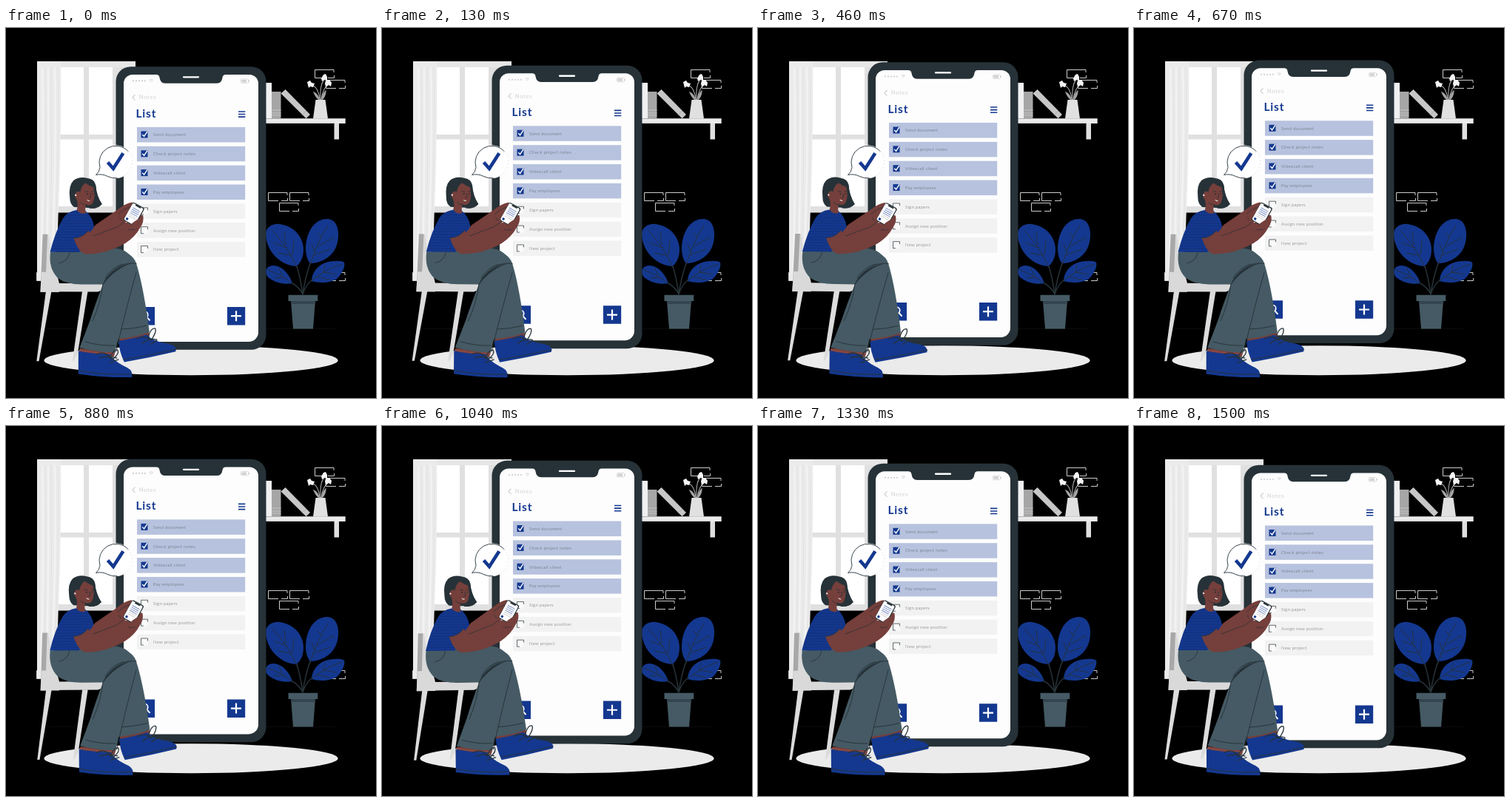
Animation of 500x500 px, one loop 1.54 s. Source, as an HTML page:

```html
<!DOCTYPE html>
<html lang="en">
<head>
<meta charset="utf-8">
<title>To-do list</title>
<style>
html, body { margin: 0; width: 100%; height: 100%; overflow: hidden; background: #000; }
svg { display: block; width: 100vw; height: 100vh; }
text { font-family: Lato, "Open Sans", sans-serif; }
.blue { fill: #14388f; }
.dark { fill: #263238; }
.slate { fill: #455a64; }
.skin { fill: #753f3b; }
.line { fill: none; stroke: #263238; stroke-width: .9; stroke-linecap: round; stroke-linejoin: round; }
.tick { fill: none; stroke: #fff; stroke-width: 1.4; }
.brick { fill: none; stroke: #e4e4e4; stroke-width: .9; }
.item { font-size: 6px; font-weight: 300; letter-spacing: .28px; fill: #50565c; }
</style>
</head>
<body>
<svg viewBox="0 0 500 500">
  <defs>
    <pattern id="stripes" width="8" height="3.8" patternUnits="userSpaceOnUse">
      <rect class="blue" width="8" height="3.8"/>
      <path d="M0 2H8" stroke="#10296a" stroke-width=".7"/>
    </pattern>
    <path id="brick" d="M26 4V.5H.5V11.500H14M18 11.500H26.500V8"/>
  </defs>

  <g id="room">
    <path d="M55 406.500H445" stroke="#101010" stroke-width=".8"/>
    <g id="bricks" class="brick"></g>

    <path fill="#e0e0e0" d="M42 45H175V249.500H60V45Z"/>
    <path fill="#e6e6e6" d="M72 45H175V53H72Z"/>
    <path fill="#fff" d="M70 53h35v91H70zM112 53h32v91h-32zM70 150.500h35V241H70zM112 150.500h32V241h-32z"/>
    <path fill="#ebebeb" d="M42 45H74Q75 150 71 240Q69 300 69 341H42Z"/>
    <path fill="none" stroke="#f5f5f5" stroke-width="1.600" d="M49 53Q52 180 47 338M57 53Q58 180 55 338M66 53Q68 170 63 300"/>
    <path fill="none" stroke="#e0e0e0" stroke-width=".8" d="M53 53Q55 180 51 338M61 53Q63 180 59 320M70 53Q72 150 67 280"/>

    <path fill="#f0f0f0" d="M351 74h8v48h-8z"/>
    <path fill="#a6a6a6" d="M359 86h12.500v36H359z"/>
    <path stroke="#c4c4c4" stroke-width="1" d="M359 111h12.500M359 115h12.500M359 118h12.500"/>
    <path fill="#c7c7c7" d="M371.500 88.500L377.500 83L411 117L405.500 122.300Z"/>
    <path stroke="#adadad" d="M400 117.500L406 112"/>
    <path fill="#e0e0e0" d="M443.500 128h6.500v22.500h-6.500zM418.500 97h13l3.500 25.500h-20z"/>
    <path fill="#ebebeb" d="M350 122.300H458.700V129H350z"/>
    <path fill="#d6d6d6" d="M350 127.500H444V129H350z"/>
    <g fill="none" stroke="#a6a6a6" stroke-width="1.100">
      <path d="M424 97Q423 82 414 77M425 97Q424 76 430 70M426 97Q428 82 435 77"/>
      <path fill="#a6a6a6" d="M423 97Q419 94 416 87Q422 90 423 97M427 97Q427 90 432 85Q432 92 427 97"/>
    </g>
    <path fill="#f4f4f4" d="M407 73L411 71L413 74L417 75L415 80L411 79L409 81ZM426 68L429 63L432 62L434 66L434 71L430 70L427 72ZM432 71L437 70L440 74L439 79L436 77L432 80L431 75Z"/>

    <ellipse cx="250" cy="449.200" rx="198.500" ry="20" fill="#ebebeb"/>

    <path class="blue" d="M392 322C372 321 352 303 351 279C351 269 360 264 370 265C391 268 402 284 402 300C402 311 397 319 392 322Z"/>
    <path class="blue" d="M411 318C403 309 403 288 411 273C418 260 432 255 441 260C451 266 451 286 445 298C438 312 423 318 411 318Z"/>
    <path class="blue" d="M387 345C374 348 357 342 352 334C349 327 353 321 362 321C374 322 383 333 387 345Z"/>
    <path class="blue" d="M413 342C413 332 420 321 432 317C442 314 455 314 457 317C459 321 454 333 447 339C438 345 423 345 413 342Z"/>
    <path class="line" d="M360 274Q383 298 393 324M363 291L380 297M369 304L386 308M376 276L378 293M389 288L387 306M435 267Q420 290 411 320M421 277L426 282M443 283L422 295M413 292L417 303M438 299L416 307M354 327Q373 334 388 346M363 338L375 337M369 325L373 334M454 319Q430 327 412 342M431 321L429 330M446 333L429 330M437 340L420 336"/>
    <path class="line" style="stroke-width:1.500" d="M401 360Q398 338 393 322M401 360Q404 338 411 318M401 360Q396 350 387 345M401 360Q405 347 413 341"/>
    <path class="slate" d="M385 368H418L415 406.500H388Z"/>
    <path fill="#344650" d="M385 368H418L417.500 373H385.500Z"/>
    <path class="slate" d="M381.500 360.800H421.300V369H381.500Z"/>
  </g>

  <g id="device">
    <rect class="dark" x="148.500" y="52.300" width="203" height="382.500" rx="20"/>
    <path fill="#fdfdfd" d="M171 63H203Q207 63 207.500 67Q208.500 74.700 215 74.700H285Q291.500 74.700 292.500 67Q293 63 297 63H329A12 12 0 0 1 341 75V411A13 13 0 0 1 328 424H172A13 13 0 0 1 159 411V75A12 12 0 0 1 171 63Z"/>
    <path stroke="#fff" stroke-width="2.300" stroke-linecap="round" d="M240 66.400H260"/>
    <path stroke="#cfcfcf" stroke-width="2.200" stroke-linecap="round" stroke-dasharray="0 4" d="M172 71.500H189"/>
    <path fill="none" stroke="#d2d2d2" d="M193.500 70.500Q196.200 68.200 199 70.500M194.800 72.300Q196.200 71 197.700 72.300"/>
    <path fill="#d2d2d2" d="M318.500 70h6.500v3.500h-6.500zM328 70.700h1v2h-1z"/>
    <rect x="317.500" y="69" width="10" height="5.400" rx="1" fill="none" stroke="#d2d2d2" stroke-width=".8"/>
    <path fill="none" stroke="#cfcfcf" stroke-width="1.200" d="M174.500 90L171 93.800L174.500 97.600"/>
    <text x="179.800" y="96.400" font-size="7.500" font-weight="700" letter-spacing=".7" fill="#dcdcdc">Notes</text>
    <text class="blue" x="175.500" y="120.700" font-size="15.500" font-weight="700" letter-spacing=".8">List</text>
    <path stroke="#14388f" stroke-width="1.600" d="M314 113h9.300M314 116.600h9.300M314 120.200h9.300"/>
    <g id="rows"></g>
    <path class="blue" d="M177 377h24v24.500h-24zM299 377h24.200v24.500H299z"/>
    <path stroke="#fff" stroke-width="2.200" d="M304 389.200h14M311 382.200v14"/>
    <path fill="none" stroke="#fff" stroke-width="2" d="M190.500 391L194.500 395.500"/>
    <circle cx="187.500" cy="387.500" r="4.200" fill="none" stroke="#fff" stroke-width="1.800"/>
  </g>

  <g id="bubble">
    <path fill="#fff" d="M121.500 198.500Q126 195 127 188.500A22.500 22.500 0 1 1 138 200.800Q130 196.500 121.500 198.500Z"/>
    <path class="line" d="M165 166.500A22.500 22.500 0 0 0 127 188.500Q126 195 121.500 198.500Q130 196.500 138 200.800Q143 203.300 150 202.800"/>
    <path fill="none" stroke="#cfcfcf" stroke-width=".7" stroke-dasharray="1.500 3" d="M165 166.500Q171 173 170.200 182Q168 200 150 202.800"/>
    <path fill="none" stroke="#14388f" stroke-width="4.600" d="M137.500 181.500L145 190L158.300 169.200"/>
  </g>

  <g id="person">
    <path fill="#d9d9d9" d="M53.500 279H57.500L61 303L72 345H132Q133 355 124 356.500H50Z"/>
    <path fill="#a8a8a8" d="M49.500 279H56L53 357H46.500Z"/>
    <path fill="#d9d9d9" d="M48 330H66L72 357H46.500Z"/>
    <path fill="#dcdcdc" d="M54 356H61.500L44.700 450.500H41.500ZM103 356H110.500L97 440L92 450H90Z"/>

    <path class="skin" d="M100 433L148 437L146 444L99 441ZM152 418L193 410L194 418L155 426Z"/>
    <path class="blue" d="M152.500 423Q172 420 190 414.500Q200 424 217 426Q229 428 230 434L229.500 437Q196 445 160 451.500Q153 437 152.500 423Z"/>
    <path class="line" d="M159 448Q196 442 230 434"/>
    <path class="slate" d="M140 300Q170 300 176 318Q186 350 194 411Q175 418 152 420Q140 418 138 400Z"/>
    <path class="line" d="M156 407Q175 406 190 402"/>
    <path class="slate" d="M60 303Q57 325 70 338Q82 347 104 346.500H131Q121 372 114 394Q107 413 99.500 432Q122 438 147.500 438.500Q158 390 176 330Q175 310 160 301Q140 292 98 301Z"/>
    <path class="line" d="M72 318Q84 315 86 304M176 330Q160 388 149 437M131 346.500Q139 328 158 320Q166 317 176 318M134 338Q143 323 158 319M107 424Q127 430 147 429M131 346.500Q128 372 117 396"/>
    <path class="dark" d="M131 347Q140 323 173 317Q148 324 131 347Z"/>
    <path fill="none" stroke="#8b4943" stroke-width="2" d="M99 435Q122 440 147 440"/>
    <path class="blue" d="M98 436.500Q119 441 140 440.500Q146 450 160 457Q170 461 170.500 467V472Q130 472.500 98 467.500Z"/>
    <path class="line" d="M98 463Q132 469.500 170.500 467.500"/>
    <path class="line" style="stroke-width:1.300" d="M122 441Q134 435 144 448Q154 440 151 435Q145 434 140 447M126 446Q136 442 150 446M140 452L152 448M177 420Q186 414 196 422Q204 411 202 406Q196 404 192 419M184 426Q194 418 204 421M196 427L204 422"/>

    <path class="skin" d="M111 270Q116 272 121 266L150 246Q161 237 170 235.500Q174 237 170 241L164 248L162 262L150 272L116 284Z"/>
    <path fill="url(#stripes)" d="M95 246Q83 248 77 257Q66 276 59.500 303H99L108 283L119 269Q117 255 107 247Z"/>
    <path class="skin" d="M91.500 284Q103 284 111 274Q116 279 119 280L149 270L160 263L175 262L179 252L185 253Q187 262 181 270Q175 282 161 291Q135 306 108 305.500Q98 304 91.500 284Z"/>
    <path class="line" style="stroke-width:.7" d="M118 281L150 269L160 262M91.500 284Q103 284 111 274M165 272Q174 275 180 268M152 251Q158 245 167 242M153 256L156 260"/>
    <g transform="translate(172.700 251.500) rotate(29)">
      <rect class="dark" x="-9" y="-14" width="18" height="28" rx="2.500"/>
      <rect x="-8.500" y="-12.800" width="16.300" height="25.800" rx="2" fill="#fff"/>
      <path class="dark" d="M-4 -13H4V-11H-4Z"/>
      <path stroke="#7d91c4" d="M-5.500 -7H5.500M-5.500 -4.500H5.500M-5.500 -2H5.500M-5.500 .5H5.500"/>
      <path stroke="#d5d5d5" d="M-5.500 3H5.500M-5.500 5.500H5.500"/>
      <path class="blue" d="M-6.500 8.500h3v3h-3z"/>
    </g>
    <path class="skin" d="M170 264Q178 258 183 256Q186 262 179 271L170 272ZM153 252Q160 246 166 245L163 251L157 260Z"/>

    <path class="dark" d="M86 229Q84 213 91 206Q99 200 110 203Q119 204 121 212Q122 226 129.500 238Q122 246 112 243L92 242Q86 238 86 229Z"/>
    <path class="skin" d="M94 223Q97 219 100 222Q101 214 107 209.500Q113 214 120 216Q121 230 117 237Q113 241 108 238.500Q106 245 108 250Q101 253 95.500 246Q98 238 95 231Q91 227 94 223Z"/>
    <path class="dark" d="M118 215L121 213Q122 229 129.500 238Q123 245 112 243.500Q119 237 119.500 226Z"/>
    <path class="line" style="stroke-width:.8" d="M107 221L111 221.500M115.500 221.500L118 220.500M113.500 224L114.500 229L112 229.500M108 239Q104 240 101 236"/>
    <path fill="none" stroke="#f2e6e4" stroke-width="1.100" d="M109.500 232.500Q111.500 234.300 113 233.500"/>
    <circle class="dark" cx="109.800" cy="224.500" r="1"/>
    <circle class="dark" cx="117" cy="224.300" r=".9"/>
    <circle cx="94" cy="226" r="1.100" fill="#fff"/>
  </g>
</svg>
<script>
const $ = id => document.getElementById(id);

const bricks = [[417, 56], [432, 70], [354, 222], [383, 222], [369, 236], [432, 330], [41, 330]];
$('bricks').innerHTML = bricks.map(([x, y]) => `<use href="#brick" x="${x}" y="${y}"/>`).join('');

const tasks = ['Send document', 'Check project notes', 'Videocall client', 'Pay employees',
  'Sign papers', 'Assign new position', 'New project'];
const doneCount = 4;

function row(label, i) {
  const done = i < doneCount;
  const box = done
    ? '<path class="blue" d="M5.500 5.500h9v9h-9z"/><path class="tick" d="M7.300 10L9.600 12.500L14 5.800"/>'
    : '<path fill="#fafafa" d="M5.500 5.500h9v9h-9z"/><path class="line" style="stroke-width:.7" d="M8.500 14.500H5.500V5.500H14.500V8.500"/>';
  return `<g transform="translate(177 ${134 + i * 25.85})">
    <rect width="146.200" height="20.500" fill="${done ? '#b7c2de' : '#f2f2f2'}"/>
    ${box}<text class="item" x="22" y="12.300">${label}</text></g>`;
}
$('rows').innerHTML = tasks.map(row).join('');

const LOOP = 1540, FPS = 24, STEPS = 37;

function draw(now) {
  const step = Math.floor((now % LOOP + 5) * FPS / 1000) % STEPS;
  const u = (step + 1) % STEPS / STEPS;
  const lift = 1 - Math.abs(1 - 2 * u);                         // 0 → 1 → 0, linear
  const sway = Math.asin(Math.sin(2 * Math.PI * u)) * 2 / Math.PI; // 0 → 1 → -1 → 0, linear
  $('device').setAttribute('transform', `translate(0 ${0.5 - 10 * lift})`);
  $('person').setAttribute('transform', `rotate(${sway} 136 337)`);
}

const start = performance.now();
function tick() {
  draw(performance.now() - start);
  requestAnimationFrame(tick);
}
tick();
</script>
</body>
</html>
```
